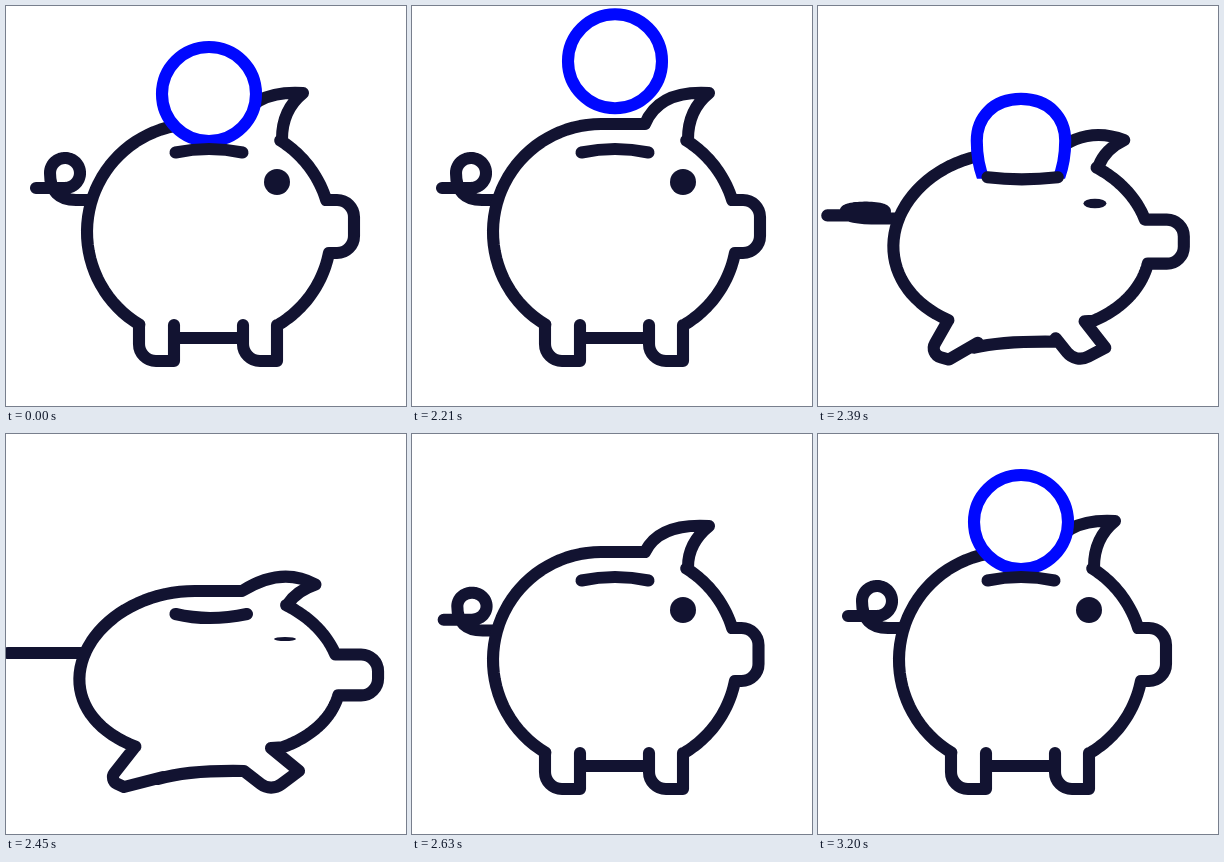
These frames come from a looping animation (400x400 px, 3.23 s). An HTML page with a canvas:

```html
<!DOCTYPE html>
<html lang="en">
<head>
<meta charset="utf-8">
<title>Piggy bank</title>
<style>
html, body { margin: 0; width: 100%; height: 100%; overflow: hidden; background: #fff; }
canvas { display: block; width: 100vmin; height: 100vmin; }
</style>
</head>
<body>
<canvas id="stage" width="400" height="400"></canvas>
<script>
const ctx = document.getElementById('stage').getContext('2d');
const LOOP = 3230, START = 2030, STEP = 30;
const INK = '#121331', BLUE = '#0008ff', LINE = 12.1;
const TOP = 118, MIDDLE = 226, RADIUS = 108, REAR = 189, FRONT = 217;

const mix = (a, b, k) => a + (b - a) * k;
const clamp = v => Math.min(1, Math.max(0, v));
const span = (t, from, to) => clamp((t - from) / (to - from));
const smooth = u => u * u * (3 - 2 * u);

// Traces an arc in degrees, passing every point through a deformation.
function traceArc(cx, cy, r, from, to, deform) {
  const count = 40;
  for (let i = 0; i <= count; i++) {
    const a = mix(from, to, i / count) * Math.PI / 180;
    ctx.lineTo(...deform(cx + r * Math.cos(a), cy + r * Math.sin(a)));
  }
}

function drawBody(squash, settle) {
  const shift = (x, y, dx, dy) => [x + squash * dx, y + squash * dy];
  // Sinks the back, widens the sides and leaves the hips almost in place.
  const warp = (x, y) => {
    const d = y - TOP;
    return shift(x, y, 0.07 * (x - 190), 39 - 0.13 * d - 0.00047 * d * d);
  };
  const flop = (x, y, dx, dy) => {
    const [wx, wy] = warp(x, y);
    return [wx + dx * squash, wy + dy * squash + 5 * settle];
  };
  const nose = y => {
    const [x, wy] = warp(348, y);
    return [x + 13 * squash - 1.5 * settle, wy];
  };
  const flank = (cx, from, to) => traceArc(cx, MIDDLE, RADIUS, from, to, warp);

  ctx.beginPath();
  // Left leg, back
  const leftHip = warp(133, 319);
  ctx.moveTo(...shift(168, 319, -11, 24));
  ctx.lineTo(...shift(168, 355, -50, -2));
  ctx.arcTo(...shift(133, 355, -30, -9), ...leftHip, mix(17, 7, squash));
  ctx.lineTo(...leftHip);
  flank(REAR, 121, 270);

  // Ear
  const tip = flop(297, 87, 5, 21);
  ctx.lineTo(...warp(233, TOP));
  ctx.quadraticCurveTo(...flop(247, 84, 25, 5), ...tip);
  ctx.quadraticCurveTo(...flop(276, 104, 9, 12), ...warp(276, 133));
  flank(FRONT, -58, -17.2);

  // Snout
  const lip = warp(326, 247);
  ctx.arcTo(...nose(194), ...nose(247), 17);
  ctx.arcTo(...nose(247), ...lip, 17);
  ctx.lineTo(...lip);
  flank(FRONT, 11.2, 60);

  // Right leg
  const rightKnee = shift(237, 319, 1, 18);
  ctx.lineTo(...shift(271, 319, -6, -5));
  ctx.lineTo(...shift(271, 355, 22, -18));
  ctx.arcTo(...shift(237, 355, 28, 3), ...rightKnee, 17);
  ctx.lineTo(...rightKnee);

  // Belly
  ctx.moveTo(...shift(168, 332, -16, 13));
  ctx.quadraticCurveTo(...shift(190, 332, -8, 4), ...shift(237, 332, 1, 5));
  ctx.stroke();
}

function drawTail(squash, settle) {
  const pull = (x, y) => [
    x + (squash - 0.06 * settle) * (0.42 * (x - 30) - 28),
    mix(y, 219, squash + 0.1 * settle)
  ];
  ctx.beginPath();
  ctx.moveTo(...pull(30, 182));
  traceArc(59, 167, 15, 90, -180, pull);
  ctx.quadraticCurveTo(...pull(44, 194), ...pull(70, 194));
  ctx.lineTo(...pull(84, 194));
  ctx.stroke();
}

function drawEye(squash) {
  ctx.beginPath();
  ctx.ellipse(mix(271, 279, squash), mix(176, 205, squash),
    mix(13, 11, squash), mix(13, 2, squash), 0, 0, 2 * Math.PI);
  ctx.fillStyle = INK;
  ctx.fill();
}

function drawSlot(squash) {
  const y = mix(146.5, 180, squash);
  ctx.beginPath();
  ctx.moveTo(169.5, y);
  ctx.quadraticCurveTo(203, y + mix(-7, 8, squash), mix(236.5, 241, squash), y);
  ctx.strokeStyle = INK;
  ctx.stroke();
}

// Taper turns the circle into an egg that narrows towards the slot.
function drawCoin({ y, scale = 1, taper = 0 }, floor) {
  const round = 0.5523, x = 203;
  const rx = (47 - taper * taper) * scale;
  const up = (47 - 3 * taper) * scale, down = (47 + 15 * taper) * scale;
  const mid = y - 9 * taper;
  const hx = rx * (round + 0.05 * taper), hy = down * (round - 0.05 * taper);
  ctx.save();
  ctx.beginPath();
  ctx.rect(0, 0, 400, floor);
  ctx.clip();
  ctx.beginPath();
  ctx.moveTo(x, mid - up);
  ctx.bezierCurveTo(x + hx, mid - up, x + rx, mid - up * round, x + rx, mid);
  ctx.bezierCurveTo(x + rx, mid + hy, x + hx, mid + down, x, mid + down);
  ctx.bezierCurveTo(x - hx, mid + down, x - rx, mid + hy, x - rx, mid);
  ctx.bezierCurveTo(x - rx, mid - up * round, x - hx, mid - up, x, mid - up);
  ctx.closePath();
  ctx.fillStyle = '#fff';
  ctx.fill();
  ctx.strokeStyle = BLUE;
  ctx.stroke();
  ctx.restore();
}

function coinAt(t) {
  if (t < START) return { y: 88 };
  if (t < 2180) return { y: 55 + 33 * (1 - span(t, 2000, 2180)) ** 2 };
  if (t < 2450) {
    return { y: 55 + 180 * ((t - 2180) / 260) ** 3, taper: 2 * span(t, 2240, 2420) };
  }
  if (t <= 2750) return null;
  if (t < 3000) {
    const u = smooth(span(t, 2750, 3000));
    return { y: mix(195, 67, u), scale: mix(0.85, 1, u) };
  }
  return { y: 88 - 21 * (1 - span(t, 3000, 3200)) ** 1.6 };
}

function draw(t) {
  const rebound = smooth(span(t, 2450, 2540));
  const squash = smooth(span(t, 2270, 2450)) - rebound;
  const settle = 2 * (rebound - smooth(span(t, 2540, 2720)));
  const coin = coinAt(t);

  ctx.fillStyle = '#fff';
  ctx.fillRect(0, 0, 400, 400);
  ctx.lineWidth = LINE;
  ctx.lineCap = ctx.lineJoin = 'round';
  ctx.strokeStyle = INK;
  drawTail(squash, settle);
  drawBody(squash, settle);
  drawEye(squash);
  if (coin) drawCoin(coin, mix(143, 183, squash));
  drawSlot(squash);
}

function tick() {
  const t = performance.now() % LOOP;
  draw(t < START ? 0 : START + Math.floor((t - START) / STEP) * STEP);
  requestAnimationFrame(tick);
}
tick();
</script>
</body>
</html>
```
